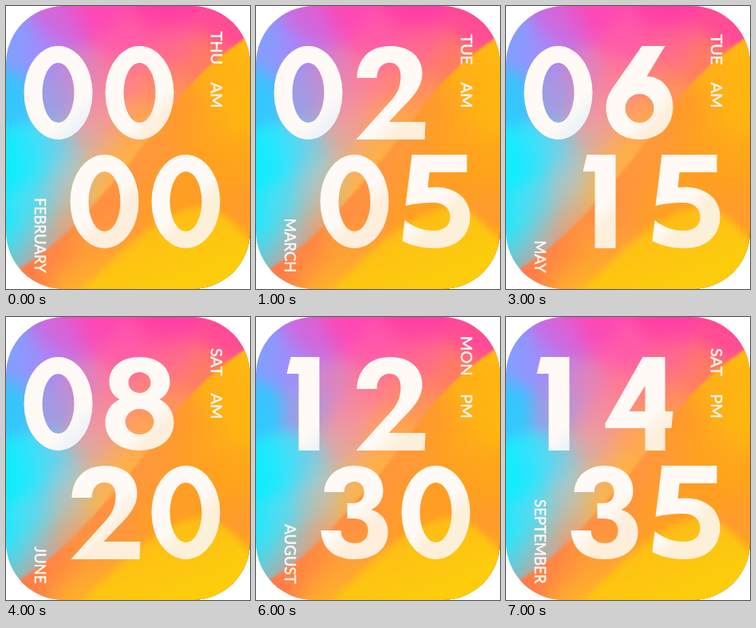
Write an HTML page with a canvas that moves like this. It is 306 px wide and 354 px high and loops after 8000 ms.

```html
<!DOCTYPE html>
<html lang="en">
<head>
<meta charset="utf-8">
<title>Watch face</title>
<style>
  html, body { margin: 0; width: 100%; height: 100%; overflow: hidden; background: #fff; }
  canvas { display: block; width: 306px; height: 354px; }
</style>
</head>
<body>
<canvas id="face" width="306" height="354"></canvas>
<script>
const W = 306, H = 354, STEP = 1000, COUNT = 8;
const ctx = document.getElementById('face').getContext('2d');

const MONTHS = ['FEBRUARY', 'MARCH', 'APRIL', 'MAY', 'JUNE', 'JULY', 'AUGUST', 'SEPTEMBER'];
const DAYS = ['THU', 'TUE', 'THU', 'TUE', 'SAT', 'THU', 'MON', 'SAT'];

const oval = (cx, cy, rx, ry) =>
  `M${cx - rx} ${cy}a${rx} ${ry} 0 1 1 ${2 * rx} 0a${rx} ${ry} 0 1 1 ${-2 * rx} 0Z`;

// Digits live in a cell 86 wide and 117 high.
const GLYPHS = [
  oval(43, 58.5, 43, 58.5) + oval(43, 58.5, 20, 37.5),
  'M21 0H57V117H31V21H16Z',
  'M2 40C3 14 20 0 44 0C68 0 84 14 84 34C84 50 75 61 61 75L42 95H88L87 117H1L46 67C54 58 57 48 57 38C57 27 52 21 43 21C34 21 27 28 27 40Z',
  'M5 33C6 13 22 0 43 0C64 0 79 12 79 31C79 43 73 51 64 55C77 59 85 69 85 83C85 104 68 117 43 117C18 117 2 104 1 81H26C26 91 33 97 43 97C54 97 60 91 60 81C60 71 53 66 41 66H34V47H40C50 47 55 42 55 33C55 25 50 20 43 20C35 20 30 25 30 33Z',
  'M47 0H75V68H85L83 89H75V117H50V89H0V83ZM50 36L30 68H50Z',
  'M13 0H82V22H35L33 41C64 37 86 53 86 77C86 101 69 117 42 117C27 117 13 114 1 108L4 82C15 91 28 95 40 95C54 95 61 88 61 78C61 67 53 60 40 60C27 60 17 61 5 64Z',
  'M46 0H75L52 38C72 38 85 56 85 76C85 101 67 117 43 117C18 117 1 101 1 77C1 66 5 58 11 50Z' + oval(43, 78, 18, 18),
  '',
  'M43 0C65 0 81 12 81 31C81 41 76 49 68 53C79 58 86 69 86 82C86 103 68 117 43 117C18 117 0 103 0 82C0 69 7 58 18 53C10 49 5 41 5 31C5 12 21 0 43 0Z' + oval(43, 32, 14, 13) + oval(43, 81, 18, 16)
].map(d => new Path2D(d));

const COOL = [
  [8, 50, '#829fff'], [45, 60, '#a08cff'], [70, 25, '#d266dc'], [110, 5, '#ff46b4'],
  [200, 5, '#ff3ca5'], [280, 15, '#ff4b96'], [150, 45, '#ff5aaa'], [205, 50, '#ff6991'],
  [0, 110, '#32c8ff'], [65, 110, '#a09be4'], [95, 85, '#dc82c3'], [140, 90, '#ff7d91'],
  [185, 95, '#ff8773'], [245, 75, '#ff7d5f'], [115, 125, '#f591a0'], [160, 145, '#ffa062'],
  [0, 200, '#05f0ff'], [30, 190, '#28e6ff'], [62, 180, '#64d2f0'], [85, 205, '#afc8c8'],
  [105, 165, '#e1a5a0'], [125, 200, '#ffaa5f'], [5, 275, '#19ebff'], [40, 245, '#50dcf5'],
  [75, 240, '#b9bebe'], [38, 290, '#82cddc'], [85, 268, '#f5a05f'], [32, 324, '#ee8c73'],
  [8, 310, '#3cdcf5'], [212, 120, '#ff9650'], [185, 150, '#ffaf41'], [152, 195, '#ffb43c'],
  [118, 234, '#ffb43c'], [60, 295, '#e6967d']
];
const WARM = [
  [306, 50, '#ffb90f'], [262, 85, '#ffaf16'], [215, 130, '#ff9630'], [290, 130, '#fdb80f'],
  [250, 155, '#ffa51e'], [180, 180, '#ff993c'], [150, 220, '#ff9440'], [110, 262, '#ff8b46'],
  [60, 310, '#ff8246'], [20, 340, '#ff784b'], [120, 300, '#ffa532'], [85, 350, '#ffb428'],
  [240, 210, '#ff9d23'], [290, 200, '#ffa519'], [195, 240, '#ffa023'], [300, 320, '#ffb40f'],
  [292, 252, '#ff9b2d']
];

const newLayer = () => Object.assign(document.createElement('canvas'), { width: W, height: H });

// Blends colour points into one field with Gaussian weights.
function colourField(points, sigma) {
  const layer = newLayer(), c = layer.getContext('2d');
  const img = c.createImageData(W, H);
  const spots = points.map(([x, y, hex]) => {
    const n = parseInt(hex.slice(1), 16);
    return [x, y, n >> 16, n >> 8 & 255, n & 255];
  });
  for (let y = 0, i = 0; y < H; y++) {
    for (let x = 0; x < W; x++, i += 4) {
      let r = 0, g = 0, b = 0, sum = 1e-9;
      for (const [px, py, pr, pg, pb] of spots) {
        const w = Math.exp(-((x - px) ** 2 + (y - py) ** 2) / (2 * sigma * sigma));
        r += pr * w; g += pg * w; b += pb * w; sum += w;
      }
      img.data[i] = r / sum;
      img.data[i + 1] = g / sum;
      img.data[i + 2] = b / sum;
      img.data[i + 3] = 255;
    }
  }
  c.putImageData(img, 0, 0);
  return layer;
}

function buildBackground() {
  const layer = newLayer(), c = layer.getContext('2d');
  c.beginPath();
  c.roundRect(0, 0, W, H, 72);
  c.clip();
  c.drawImage(colourField(COOL, 20), 0, 0);

  const warm = newLayer(), w = warm.getContext('2d');
  w.filter = 'blur(1.5px)';
  w.fill(new Path2D('M320 27Q250 70 211 123Q160 194 102 257Q54 309 5 336V380H320Z'));
  w.filter = 'none';
  w.globalCompositeOperation = 'source-in';
  w.drawImage(colourField(WARM, 24), 0, 0);
  c.drawImage(warm, 0, 0);

  const glow = c.createLinearGradient(190, 250, 230, 345);
  glow.addColorStop(0, '#ffb919');
  glow.addColorStop(1, '#fdcd0c');
  c.fillStyle = glow;
  c.filter = 'blur(4px)';
  c.fill(new Path2D('M80 370C138 315 175 268 236 252C268 245 292 278 312 303V370Z'));
  return layer;
}

const background = buildBackground();

// The lower right of a digit turns to cream past a diagonal edge.
function drawDigit(n, x, y, edge, tint) {
  const mid = (101 + edge) / 2;
  const fill = ctx.createLinearGradient(mid - 8, mid - 8, mid + 8, mid + 8);
  fill.addColorStop(0, '#fffaf6');
  fill.addColorStop(1, tint);
  ctx.save();
  ctx.translate(x, y);
  ctx.fillStyle = fill;
  ctx.fill(GLYPHS[n], 'evenodd');
  ctx.restore();
}

function drawLabel(text, x, y, align, size) {
  ctx.save();
  ctx.translate(x, y);
  ctx.rotate(Math.PI / 2);
  ctx.font = `${size}px Lato, sans-serif`;
  ctx.textAlign = align;
  ctx.fillStyle = ctx.strokeStyle = '#fff6f0';
  ctx.lineWidth = 0.6;
  ctx.lineJoin = 'round';
  ctx.fillText(text, 0, 0);
  ctx.strokeText(text, 0, 0);
  ctx.restore();
}

function draw(now) {
  const i = Math.floor(now / STEP) % COUNT;
  const hour = i * 2, minute = i * 5;
  ctx.clearRect(0, 0, W, H);
  ctx.drawImage(background, 0, 0);
  drawDigit(Math.floor(hour / 10), 22.5, 50, 50, '#eef3f8');
  drawDigit(hour % 10, 124.5, 50, 44, '#fdefdc');
  drawDigit(Math.floor(minute / 10), 80.5, 186, 17, '#fdefdc');
  drawDigit(minute % 10, 182.5, 186, 15, '#fdf0d8');
  drawLabel(DAYS[i], 256.5, 73.5, 'right', 20);
  drawLabel(hour < 12 ? 'AM' : 'PM', 256.5, 111.5, 'center', 20);
  drawLabel(MONTHS[i], 35.8, 333.5, 'right', 18.6);
}

const start = performance.now();
function tick() {
  draw(performance.now() - start);
  requestAnimationFrame(tick);
}
tick();
</script>
</body>
</html>
```
